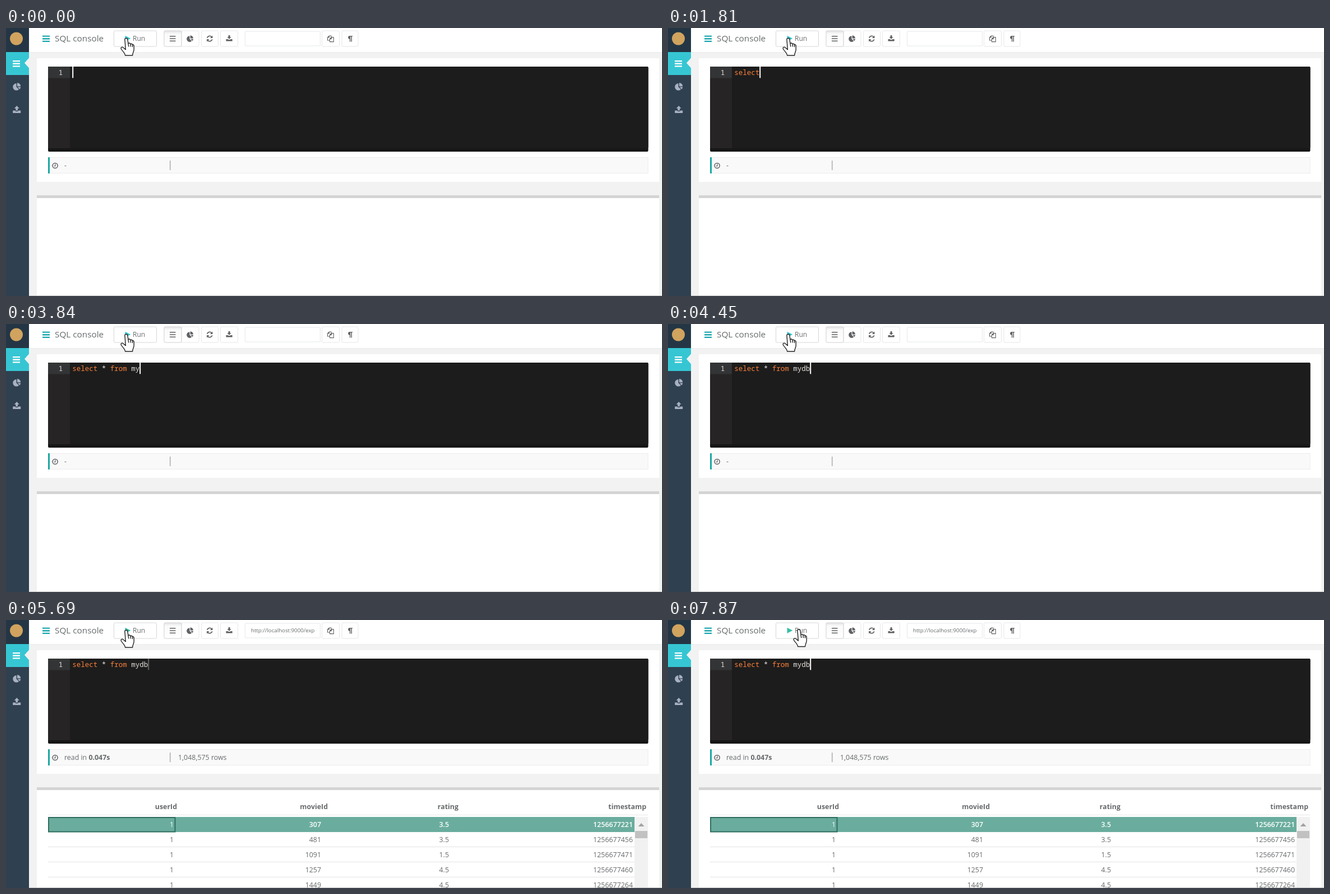
These frames come from a looping animation (1170 by 479 pixels, 8 s). An HTML page:

```html
<!DOCTYPE html>
<html lang="en">
<head>
<meta charset="utf-8">
<title>SQL console</title>
<style>
  html, body { margin: 0; width: 100%; height: 100%; overflow: hidden; background: #f2f2f2; }
  svg { display: block; width: 1170px; height: 479px; }
  text { font: 12.4px "Open Sans", sans-serif; fill: #676a6c; }
  .b { font-weight: 700; }
  .mono { font: 12.5px "Noto Sans Mono", monospace; fill: #e6e1dc; }
  .end { text-anchor: end; }
  .box { fill: #fff; stroke: #e5e7e9; }
  .ico { fill: #5f6163; }
  .line { fill: none; stroke: #5f6163; stroke-width: 1.7; }
</style>
</head>
<body>
<svg id="stage" viewBox="0 0 1170 479" xmlns="http://www.w3.org/2000/svg">
  <defs>
    <linearGradient id="press" x2="0" y2="1">
      <stop offset="0" stop-color="#e3e3e3"/>
      <stop offset=".2" stop-color="#fafafa"/>
      <stop offset="1" stop-color="#fff"/>
    </linearGradient>
    <path id="bars" d="M0 0h13v2.3H0zM0 4.6h13v2.3H0zM0 9.2h13v2.3H0z"/>
    <path id="pie" d="M6.2 1V7.3L10.7 11.8A6.3 6.3 0 1 1 6.2 1ZM7.6 0A6.3 6.3 0 0 1 13.9 6.2H7.6ZM8.3 7.5H14A6.3 6.3 0 0 1 12 11.4Z"/>
    <path id="tray" d="M0 8.6H4L5.4 10H8.6L10 8.6H14V13H0Z"/>
  </defs>

  <rect width="1170" height="479" fill="#f2f2f2"/>
  <rect x="41" width="1129" height="43" fill="#fff"/>
  <path d="M41 43.5H1170" stroke="#ebebec"/>

  <!-- sidebar -->
  <rect width="41" height="479" fill="#2f4050"/>
  <rect width="41" height="43" fill="#243645"/>
  <circle cx="18.5" cy="19" r="11.5" fill="#d0a35f"/>
  <rect y="43" width="41" height="41" fill="#36c6d3"/>
  <path d="M41 53.5L33 62.5L41 71.5Z" fill="#f2f2f2"/>
  <use href="#bars" x="12" y="58" fill="#fff"/>
  <use href="#pie" x="12.3" y="98" fill="#a7b1c2"/>
  <g transform="translate(12.2 139)" fill="#a7b1c2">
    <use href="#tray"/><path d="M7 0L11.5 4.8H8.8V8.4H5.2V4.8H2.5Z"/>
  </g>

  <!-- toolbar -->
  <use href="#bars" x="65" y="13.5" fill="#1ba8ae"/>
  <text x="87" y="24.3" style="font-size:15.3px">SQL console</text>
  <rect id="button" class="box" x="192.5" y="5" width="76" height="28" rx="2" style="stroke:#d5d6d7"/>
  <path id="play" d="M212.5 13.8L222.3 18.8L212.5 23.8Z"/>
  <rect id="stop" x="205.3" y="13.7" width="10.4" height="10" fill="#ed5565"/>
  <text id="label" y="23.2" style="font-size:12px"></text>
  <rect class="box" x="313" y="5" width="31" height="28" rx="2"/>
  <rect x="282" y="5" width="31" height="28" rx="2" fill="url(#press)" stroke="#cfd0d1"/>
  <rect class="box" x="348.5" y="5" width="30" height="28" rx="2"/>
  <rect class="box" x="382.5" y="5" width="31" height="28" rx="2"/>
  <rect class="box" x="426.5" y="6" width="134" height="26" rx="1"/>
  <rect class="box" x="563.5" y="5" width="31" height="28" rx="2"/>
  <rect class="box" x="599" y="5" width="29" height="28" rx="2"/>
  <g class="ico">
    <path d="M292 14h10.5v1.6H292zM292 18.2h10.5v1.6H292zM292 22.4h10.5v1.6H292z"/>
    <use href="#pie" transform="translate(322.2 13.3) scale(.85)"/>
    <path d="M368.5 13.4V18H363.9ZM358.1 24.6V20H362.7Z"/>
    <g transform="translate(392.5 13) scale(.8)">
      <use href="#tray"/><path d="M5.2 0H8.8V4H11.5L7 8.4L2.5 4H5.2Z"/>
    </g>
    <path d="M613 14H618V15.3H617V24.5H615.6V15.3H614.3V24.5H612.9V19.6A2.8 2.8 0 0 1 613 14Z"/>
  </g>
  <path class="line" d="M358.8 17.7A4.7 4.7 0 0 1 366.9 15.9M367.8 20.3A4.7 4.7 0 0 1 359.7 22.1"/>
  <path class="line" style="stroke-width:1.1" d="M577.5 22H573.5V17L576.3 14H580V16.5M577.5 19.5L580.3 16.6H584.3V24.6H577.5ZM576.3 14V17H573.5M580.3 16.6V19.5H577.5"/>

  <!-- editor -->
  <rect x="55" y="54" width="1110" height="221" fill="#fff"/>
  <rect x="75" y="69" width="1070.5" height="152" rx="2" fill="#161616"/>
  <rect x="75" y="69" width="1070.5" height="146" rx="2" fill="#1c1c1c"/>
  <rect x="75" y="69" width="39" height="146" fill="#262424"/>
  <rect x="75" y="69" width="39" height="20.5" fill="#333435"/>
  <text class="mono" x="93.7" y="83.5">1</text>
  <g id="code"></g>
  <rect id="caret" y="69" width="2" height="20.3" fill="#fff"/>

  <!-- status -->
  <rect x="75.5" y="231.5" width="1069.5" height="28" fill="#f9f9f9" stroke="#ececec"/>
  <rect x="75" y="231" width="3" height="29" fill="#1ba8a4"/>
  <circle class="line" cx="87.6" cy="246" r="4.6" style="stroke-width:1.5"/>
  <path class="line" style="stroke-width:1.1" d="M88 243V246.6H85.5"/>
  <rect x="291.8" y="237" width="2" height="17" fill="#bcbcbc"/>
  <text id="idle" x="104" y="250.3">-</text>

  <rect x="55" y="299" width="1110" height="5" fill="#d4d4d4"/>
  <rect x="55" y="304" width="1110" height="175" fill="#fff"/>
  <g id="result"></g>
  <path d="M41 478.5H1170" stroke="#c4c4c4"/>

  <path id="hand" fill="#fff" stroke="#222" stroke-width="1.4" stroke-linejoin="round"
    d="M211.9 20.6C211.6 17.6 216.4 17.4 216.9 20.4L218 28C219 26.4 221.6 26.8 222 28.8C223.2 27.6 225.2 28.2 225.4 30C227 29.2 228.2 30.4 228.2 32V38.5C228.2 42 226 43.5 225.6 49H212.6C212.4 44.5 207 41 205.2 37C204.4 34.4 207.4 33.2 209.2 35L213.4 38.6Z M218 28L218.8 33.5M222 28.8L222.4 33.5M225.4 30L225.6 34"/>
</svg>
<script>
const LOOP = 8000;
const RUN = 5310, DONE = 5690;
const $ = id => document.getElementById(id);

const words = [
  { text: "select", col: 0, keyword: true },
  { text: "*", col: 7 },
  { text: "from", col: 9, keyword: true },
  { text: "mydb", col: 14 }
];
const keyTimes = [700, 870, 1170, 1340, 1490, 1810, 1980, 2280, 2510, 2590,
  2820, 2895, 2970, 3450, 3520, 3840, 4070, 4450];

// Step tracks: [start time, value]
const caretTrack = [[0, 1], [550, 0], [700, 1], [5080, 0], [5230, .3], [7640, 0], [7870, 1]];
const handTrack = [[0, [0, 0]], [7010, [-1, -1]], [7085, [-1, -2]], [7160, [-2, -3]],
  [7640, [8, -3]], [7700, [19, -1.5]]];

const stepAt = (track, t) => track.filter(([start]) => start <= t).pop()[1];
const show = (el, on) => el.setAttribute("visibility", on ? "visible" : "hidden");

function buildResult() {
  const cols = [[299, 305], [562, 574], [790, 807], [1118, 1142]];
  const names = ["userId", "movieId", "rating", "timestamp"];
  const rows = [
    [1, 307, "3.5", 1256677221],
    [1, 481, "3.5", 1256677456],
    [1, 1091, "1.5", 1256677471],
    [1, 1257, "4.5", 1256677460],
    [1, 1449, "4.5", 1256677264]
  ];
  let out = `<text x="437" y="22.3" style="font-size:9.7px">http://localhost:9000/exp</text>
    <text x="104" y="250.3">read in <tspan class="b">0.047s</tspan></text>
    <text x="307" y="250.3">1,048,575 rows</text>
    <path d="M75 348.5H1145" stroke="#e7e7e7"/>
    <rect x="75" y="352" width="1046" height="27" fill="#6aad9e"/>
    <rect x="76" y="353" width="225.5" height="25.5" fill="none" stroke="#2f6d5f" stroke-width="2"/>`;
  names.forEach((name, i) => {
    out += `<text class="b end" x="${cols[i][1]}" y="337.7">${name}</text>`;
  });
  rows.forEach((row, r) => {
    const y = 370.2 + 26.9 * r;
    row.forEach((cell, i) => {
      const style = r ? "" : `fill:#fff;font-weight:${i ? 600 : 400}`;
      out += `<text class="end" x="${cols[i][0]}" y="${y}" style="${style}">${cell}</text>`;
    });
    if (r) out += `<path d="M75 ${378.5 + 27 * r}H1121" stroke="#e3e3e3"/>`;
  });
  out += `<rect x="1121" y="352" width="24" height="127" fill="#f1f1f1"/>
    <path d="M1127.5 369L1133 363L1138.5 369Z" fill="#a3a3a3"/>
    <rect x="1122" y="377" width="22" height="13" fill="#c1c1c1"/>`;
  $("result").innerHTML = out;
}

function drawCode(typed) {
  $("code").innerHTML = words.map(({ text, col, keyword }) => {
    const part = text.slice(0, Math.max(0, typed - col));
    const fill = keyword && part === text ? "#fc803a" : "#e6e1dc";
    return `<text class="mono" x="${118.3 + 7.5 * col}" y="83.5" style="fill:${fill}">${part}</text>`;
  }).join("");
}

function render(t) {
  const typed = keyTimes.filter(k => k <= t).length;
  const running = t >= RUN && t < DONE;
  const done = t >= DONE;
  const [dx, dy] = stepAt(handTrack, t);

  drawCode(typed);
  $("caret").setAttribute("x", 118.2 + 7.5 * typed);
  $("caret").setAttribute("opacity", stepAt(caretTrack, t));
  $("hand").setAttribute("transform", `translate(${dx} ${dy})`);

  $("button").style.fill = t >= 5230 && t < 5390 ? "url(#press)" : "#fff";
  $("play").setAttribute("fill", done ? "#36bea6" : "#36c6d3");
  show($("play"), !running);
  show($("stop"), running);
  $("label").textContent = running ? "Cancel" : "Run";
  $("label").setAttribute("x", running ? 218.8 : 226);
  show($("idle"), !done);
  show($("result"), done);
}

buildResult();
const begin = performance.now();
function tick() {
  render((performance.now() - begin) % LOOP);
  requestAnimationFrame(tick);
}
tick();
</script>
</body>
</html>
```
